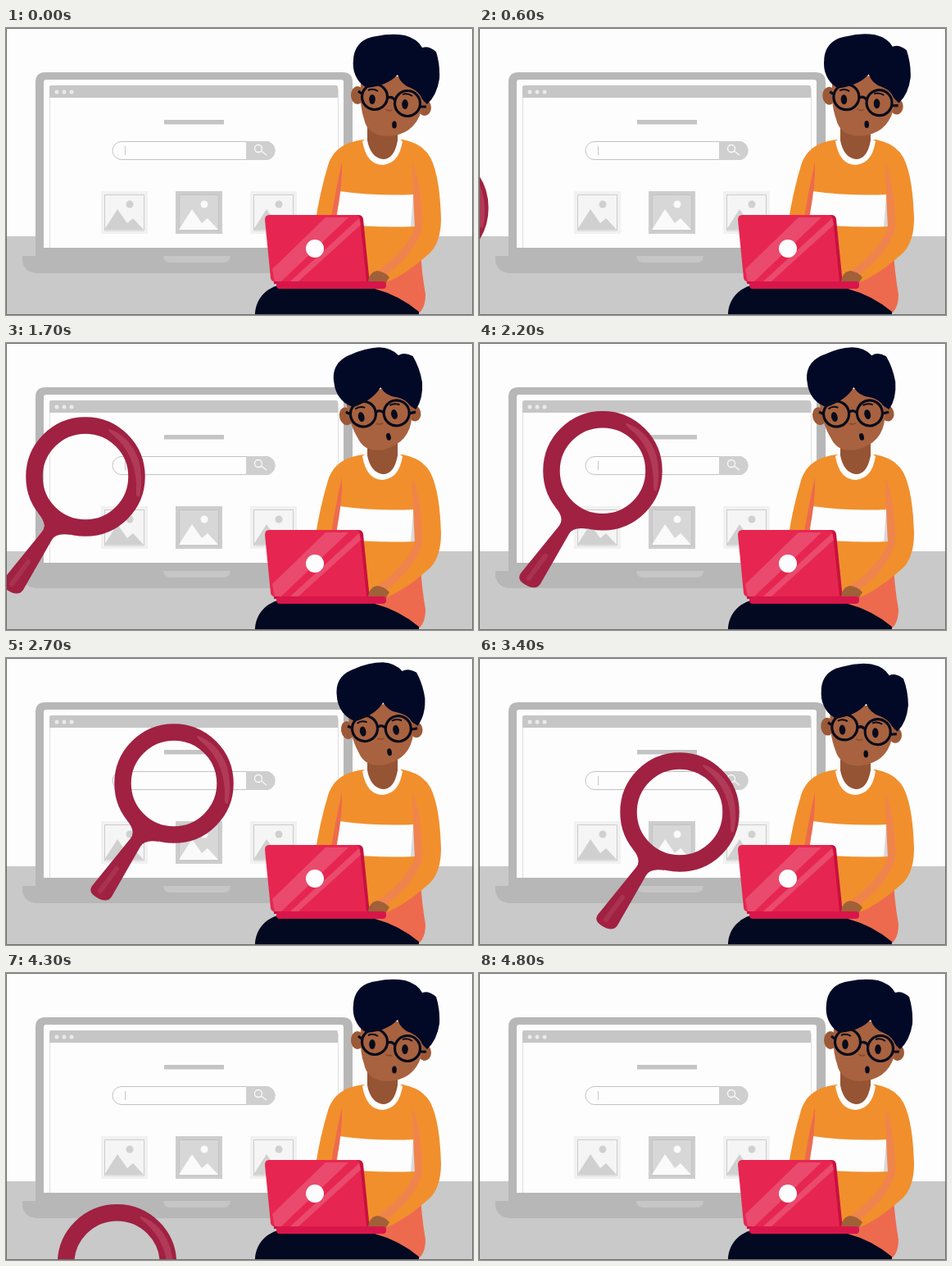
Recreate the animation shown at these times as an HTML page. Size 570 by 350 pixels, loop 5200 ms.

```html
<!DOCTYPE html>
<html lang="en">
<head>
<meta charset="utf-8">
<title>Searching</title>
<style>
html, body { margin: 0; width: 100%; height: 100%; overflow: hidden; background: #fdfdfd; }
svg { display: block; width: 570px; height: 350px; }
</style>
</head>
<body>
<svg viewBox="0 0 570 350">
  <defs>
    <g id="photo">
      <path d="M4 47L20 22L32 39L39 33L52 47Z"/>
      <circle cx="35" cy="16" r="4.5"/>
    </g>
    <g id="tile">
      <path fill="#f1f1f1" d="M0 0H57V52H0Z"/>
      <path fill="#f5f5f5" stroke="#cbcbcb" d="M4.500 4.500H52.500V48H4.500Z"/>
      <use href="#photo" fill="#d0d0d0"/>
    </g>
  </defs>

  <path fill="#fdfdfd" d="M0 0H570V350H0Z"/>
  <path fill="#c9c9c9" d="M0 254H570V350H0Z"/>

  <!-- big computer with a search page -->
  <path fill="#b7b7b7" d="M36 278V66Q36 54 48 54H411Q423 54 423 66V278Z"/>
  <path fill="#fdfdfd" d="M46 268V66Q46 63 49 63H409Q412 63 412 66V268Z"/>
  <path fill="none" stroke="#dedede" d="M53.500 268V74M405.500 268V74"/>
  <path fill="#c6c6c6" d="M53 85V72Q53 70 55 70H403Q405 70 405 72V85Z"/>
  <g fill="#eaeaea">
    <circle cx="62" cy="78" r="2.500"/><circle cx="71" cy="78" r="2.500"/><circle cx="80" cy="78" r="2.500"/>
  </g>
  <path fill="#b7b7b7" d="M20 278H439V284Q437 299 422 299H38Q22 298 20 284Z"/>
  <path fill="#c6c6c6" d="M192 278H274Q273 286 266 286H200Q193 286 192 278Z"/>
  <path fill="#c4c4c4" d="M193 112H266V117.500H193Z"/>
  <rect x="130" y="138.500" width="198" height="22" rx="11" fill="#fdfdfd" stroke="#c2c2c2"/>
  <path fill="#cfcfcf" d="M293 138H317A11.500 11.500 0 0 1 317 161H293Z"/>
  <path fill="none" stroke="#c8c8c8" d="M145.500 144V155"/>
  <g fill="none" stroke="#fafafa" stroke-width="1.300">
    <circle cx="308" cy="147" r="4.500"/><path d="M311.500 150L318 155"/>
  </g>
  <use href="#tile" x="116" y="199"/>
  <use href="#tile" x="298" y="199"/>
  <g transform="translate(207 199)">
    <path fill="#cdcdcd" d="M0 0H57V52H0Z"/>
    <path fill="#d7d7d7" stroke="#c2c2c2" d="M4.500 4.500H52.500V48H4.500Z"/>
    <use href="#photo" fill="#fafafa"/>
  </g>

  <g id="glass">
    <path fill="#a02142" d="M-58 44Q-46 58 -53 67L-100 125Q-105 132 -96 138Q-82 147 -76 138L-41 77Q-36 68 -18 71Z"/>
    <path fill="none" stroke="#a93251" stroke-width="6" stroke-linecap="round" d="M-90 131L-70 104"/>
    <circle r="62.500" fill="none" stroke="#a02142" stroke-width="20.500"/>
    <path fill="#b23a59" d="M29 -58Q55 -49 65 -20Q71 3 66 24Q62 26 62 20Q64 -27 31 -53Q27 -57 29 -58Z"/>
  </g>

  <!-- body -->
  <path fill="#ed6a4e" d="M440 240H505Q505 285 512 325Q512 340 505 347H440Z"/>
  <path fill="#020920" d="M304 350C304 334 314 316 340 312H440L450 318Q480 326 504 346V350Z"/>
  <path fill="#f18f2c" d="M437 136C412 139 400 149 393.500 166Q383 200 377 240H403V310H465Q487 301 512 279Q531 266 531 232C530 202 527 176 518 158Q509 141 484 136Z"/>
  <path fill="#fdfdfd" d="M407 199Q450 205 499 203V242Q450 244 403 238Z"/>
  <path fill="#ed6a4e" d="M410 164Q411 193 403 230H397Q404 190 410 164Z"/>
  <path fill="#d9d9de" d="M497 204L494 242H500V204Z"/>
  <path fill="#f0844d" d="M496 164Q497 210 499 244Q486 275 448 300L460 304Q500 276 508 243Q508 195 496 164Z"/>
  <path fill="#fdfdfd" d="M435 138Q440 167 460 167Q480 165 484 138L478 134H441Z"/>
  <path fill="#955434" d="M441 118H478V137Q474 160 460 160Q445 158 441 137Z"/>

  <g id="head">
    <g fill="#9c5937">
      <ellipse cx="429" cy="82" rx="8" ry="11"/>
      <ellipse cx="511" cy="97" rx="8" ry="10"/>
    </g>
    <path fill="#a8623f" d="M434 58Q430 91 437 111Q441 131 465 132Q498 131 507 101L511 60Z"/>
    <path fill="#020927" d="M441 73C429 68 422 53 424 39C425 21 436 12 452 10Q470 6 487 9Q502 13 508 24Q516 21 525 29Q530 45 529 62Q526 82 514 93L508 87Q505 78 494 73Q482 69 478 57Q466 70 441 73Z"/>
    <g fill="#070b1c">
      <ellipse cx="447" cy="87" rx="3.800" ry="6"/>
      <ellipse cx="487" cy="93" rx="3.800" ry="6"/>
      <ellipse cx="474" cy="118" rx="2.800" ry="4.500"/>
    </g>
    <g fill="none" stroke="#070b1c" stroke-width="3.200">
      <circle cx="450" cy="84" r="15.500"/>
      <circle cx="490" cy="92" r="15.500"/>
      <path d="M465 86Q470 82 475 88M434 80L430 77M505 96L513 96"/>
      <path stroke-width="2" d="M442 76Q448 73 454 77M484 81Q490 79 496 83"/>
    </g>
    <path fill="none" stroke="#8a492b" stroke-width="1.500" d="M463 99Q467 102 471 100"/>
  </g>

  <!-- small computer -->
  <path fill="#c9113f" d="M322 228H430Q435 228 436 233L444 312H327Z"/>
  <path fill="#e62650" d="M321 228H427Q431 228 432 233L440 309H327Q324 309 323 305L316 234Q316 228 321 228Z"/>
  <path fill="#ea4a6d" d="M390 231H418L336 309H328L325 294ZM431 232L433 240L357 309H347Z"/>
  <circle cx="377" cy="269" r="11" fill="#fdfdfd"/>
  <path fill="#a06038" d="M442 309Q443 298 453 296Q462 297 468 304L463 312Z"/>
  <rect x="330" y="309" width="134" height="9" rx="4" fill="#d8164a"/>

  <path fill="none" stroke="#707070" d="M.500 .500H569.500V349.500H.500Z"/>
</svg>
<script>
const LOOP = 5200, STEP = 100;
const glass = document.getElementById('glass');
const head = document.getElementById('head');

// Each key: time, then values.
const path = [
  [300, -110, 240], [1100, 18, 187], [1700, 97, 163], [2400, 172, 154],
  [2700, 205, 153], [3000, 229, 161], [3400, 245, 188], [3600, 238, 212],
  [3900, 209, 255], [4200, 152, 328], [4550, 97, 424]
];
const tilt = [[500, 0], [1100, -8.5], [1700, -13], [2100, -13], [2700, -11], [3400, -3.3], [3800, 0]];

// Smooth curve through the keys, held at both ends.
function sample(keys, t, c) {
  const last = keys.length - 1;
  if (t <= keys[0][0]) return keys[0][c];
  if (t >= keys[last][0]) return keys[last][c];
  const i = keys.findIndex(k => k[0] > t) - 1;
  const slope = j => {
    const a = keys[Math.max(j - 1, 0)], b = keys[Math.min(j + 1, last)];
    return (b[c] - a[c]) / (b[0] - a[0]);
  };
  const a = keys[i], b = keys[i + 1], d = b[0] - a[0];
  const u = (t - a[0]) / d, v = 1 - u;
  return v * v * ((1 + 2 * u) * a[c] + u * d * slope(i))
       + u * u * ((3 - 2 * u) * b[c] - v * d * slope(i + 1));
}

const start = performance.now();

function draw() {
  const now = Math.max(0, performance.now() - start) % LOOP;
  const t = Math.floor(now / STEP) * STEP;
  glass.setAttribute('transform', `translate(${sample(path, t, 1)} ${sample(path, t, 2)})`);
  glass.setAttribute('visibility', t > 300 && t < 4550 ? 'visible' : 'hidden');
  const angle = Math.min(0, sample(tilt, t, 1)), shift = angle / 5;
  head.setAttribute('transform', `translate(${shift} ${shift}) rotate(${angle} 467 137)`);
  requestAnimationFrame(draw);
}
draw();
</script>
</body>
</html>
```
